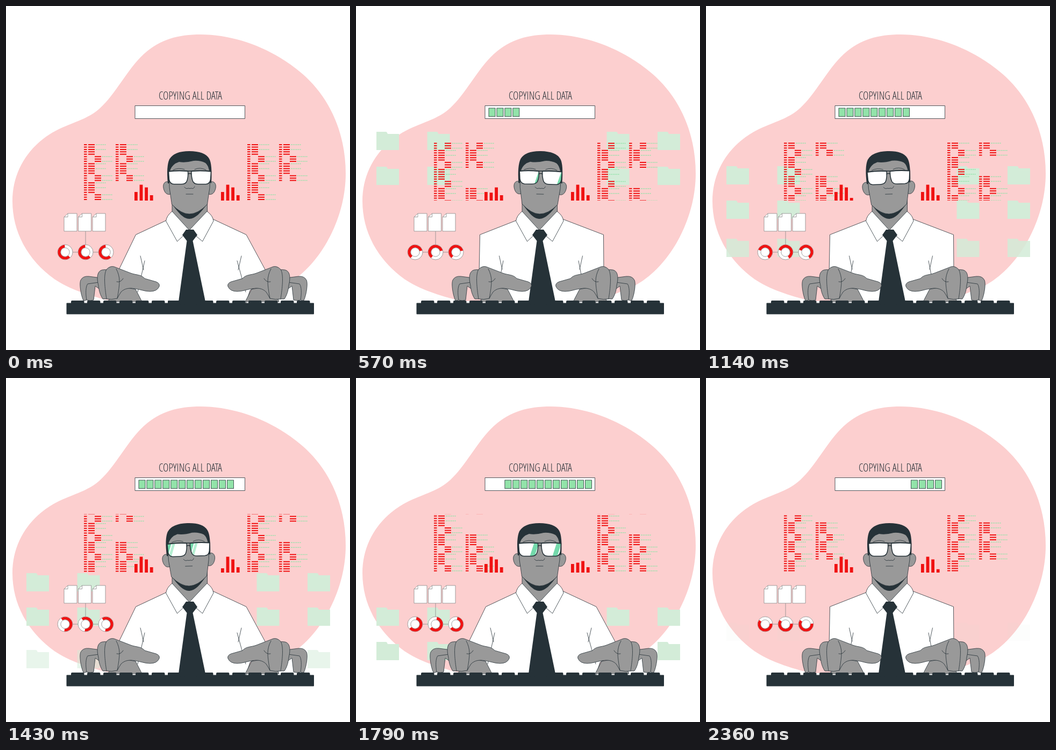
Animation of 640 by 640 pixels, one loop 2430 ms. Source, as an HTML page:

```html
<!DOCTYPE html>
<html lang="en">
<head>
<meta charset="utf-8">
<title>Copying all data</title>
<style>
html, body { margin: 0; width: 100%; height: 100%; overflow: hidden; background: #fff; }
svg { display: block; width: 100%; height: 100%; }
.ink { fill: #263238; }
.skin { fill: #999; stroke: #263238; stroke-width: .8; stroke-linejoin: round; }
.cloth { fill: #fff; stroke: #263238; stroke-width: .8; stroke-linejoin: round; }
.line { fill: none; stroke: #263238; stroke-width: .8; stroke-linecap: round; }
.paper { fill: #fff; stroke: #8a8a8a; stroke-width: .8; }
.red { fill: #f01212; }
#title {
  font-family: "Open Sans Condensed Light", "Roboto Condensed Light", "Roboto Condensed", "Open Sans Condensed", "Open Sans", sans-serif;
  font-weight: 300; font-stretch: 62.5%; font-size: 21px; text-anchor: middle; fill: #263238;
}
</style>
</head>
<body>
<svg viewBox="0 0 640 640">
  <defs>
    <clipPath id="desk"><rect width="640" height="549"/></clipPath>
    <clipPath id="listClip"><rect x="140" y="253.4" width="430" height="108.4"/></clipPath>
    <path id="lensL" d="M302.5 308 Q320 306 338.500 307.500 Q339.500 319 336 327 Q333 331.500 326 331.500 L312 331.500 Q305 331 303.500 323Z"/>
    <path id="lensR" d="M381.500 308 Q364 306 345 307.500 Q344.500 319 348 327 Q351 331.500 358 331.500 L372 331.500 Q379 331 380.500 323Z"/>
    <clipPath id="clipL"><use href="#lensL"/></clipPath>
    <clipPath id="clipR"><use href="#lensR"/></clipPath>
    <path id="folder" fill="#d3ecd8" d="M0 0H17.500Q19.500 0 20 2L21 4H42V34H0Z"/>
    <g id="hand" class="skin">
      <path d="M203 520 L241 527 L253 550 H190Z"/>
      <path d="M144 548 C139 537 136 516 139 510 Q143 502 154 503 L185 507 L180 520 L153 519 L151 546 Q147 549 144 548Z"/>
      <path d="M150 547 C148 535 148 522 152 517 L180 513 L176 528 L166 521 L163 547 Q157 549 150 547Z"/>
      <path d="M180 545 C175 537 173 530 172 520 C168 504 170 493 179 491 Q190 489 195 495 L194 543 Q187 546 180 545Z"/>
      <path d="M187 545 C184 525 181 500 187 490 Q194 483 201 485 L232 497 C243 501 251 499 258 507 L279 513 Q287 516 285 522 Q281 531 268 531 C257 531 250 527 240 526 C230 524 221 525 214 532 Q210 538 207 544 Q196 547 187 545Z"/>
      <path class="line" d="M205 489Q211 500 211 512Q211 523 207 544M218 507Q213 515 206 513"/>
    </g>
  </defs>

  <path fill="#fccfcf" clip-path="url(#desk)" d="M362 53C430 53 500 82 550 125C605 172 632 240 632 312C632 400 580 490 515 522C450 552 400 558 345 558H260C200 554 130 535 90 508C40 472 12 420 12 363C12 300 50 250 105 226C135 213 155 208 175 190C205 163 225 118 258 88C288 62 320 53 362 53Z"/>
  <g id="folders"></g>

  <text id="title" x="343" y="174">COPYING ALL DATA</text>
  <rect class="cloth" x="240" y="185.500" width="204.500" height="24"/>
  <g id="cells"></g>

  <g clip-path="url(#listClip)"><g id="lists"></g></g>
  <g id="bars" class="red"></g>
  <path class="paper" d="M148 419V445M110 458H186"/>
  <g id="docs"></g>

  <path id="shirt" class="cloth"/>
  <path id="folds" class="line"/>
  <path class="skin" d="M309 360V384L341 418L374.500 384V360Z"/>

  <g id="head">
    <path class="skin" d="M304 328C297 324 291 330 293 339C295 348 300 352 306 350Z"/>
    <path class="skin" d="M379 328C386 324 392 330 390 339C388 348 383 352 377 350Z"/>
    <path class="ink" d="M308.500 368C321 385 330 396 341 396C352 396 362 385 374.500 368Z"/>
    <path class="skin" d="M303 295L304 338L308.500 369Q326 387 341 387Q357 387 374.500 369L379 338L380 295Q341 268 303 295Z"/>
    <path class="ink" d="M301 330Q298 298 304 285Q313 270 341 270Q370 270 378 284Q384 294 382 330L379 328L378 306Q376 296 371 292Q361 287 349 288Q334 292 322 290L315 293Q307 299 305 307L303.500 330Z"/>
    <path class="line" d="M311 305Q321 300 332 304M351 304Q361 299 372 305"/>
    <path class="line" d="M332 337Q335 341 339 339Q342 340 345 339Q349 341 351 336M335 350H348"/>
    <use href="#lensL" fill="#fff"/>
    <use href="#lensR" fill="#fff"/>
    <g clip-path="url(#clipL)"><g class="glare"></g></g>
    <g clip-path="url(#clipR)"><g class="glare"></g></g>
    <g fill="none" stroke="#263238" stroke-width="1.500">
      <use href="#lensL"/><use href="#lensR"/>
      <path d="M338 313Q342 310 345.500 313M302 307.500Q320 305.500 339 307H345Q364 305.500 382 307.500"/>
    </g>
  </g>

  <path class="cloth" d="M309 382Q299 390 297.500 400L318.500 438L341 417Z"/>
  <path class="cloth" d="M374 382Q385 390 386 400L365.500 438L341 417Z"/>
  <path class="ink" d="M335 416H349L356 426L347.500 437L371 550H321L336.500 437L328 426Z"/>

  <use id="handL" href="#hand"/>
  <use id="handR" href="#hand"/>
  <g id="keys" class="ink">
    <rect x="112.500" y="552.500" width="460.500" height="21" rx="1"/>
    <rect x="301" y="548" width="84" height="8" rx="2"/>
  </g>
</svg>

<script>
const LOOP = 2430, STEPS = 34;
const $ = id => document.getElementById(id);

function add(parent, tag, attrs) {
  const el = document.createElementNS('http://www.w3.org/2000/svg', tag);
  for (const k in attrs) el.setAttribute(k, attrs[k]);
  parent.appendChild(el);
  return el;
}

// Linear interpolation through [step, value] pairs, clamped at both ends.
function track(keys, s) {
  if (s <= keys[0][0]) return keys[0][1];
  for (let n = 1; n < keys.length; n++) {
    const [a, va] = keys[n - 1], [b, vb] = keys[n];
    if (s <= b) return va + (vb - va) * (s - a) / (b - a);
  }
  return keys[keys.length - 1][1];
}

// Folders: each row carries four copies
const rows = [
  { y: [[4, 234], [12, 364], [16, 433], [20, 506], [24, 550]],
    o: [[1, 0], [4, 1], [15, 1], [16, .85], [20, .5], [24, 0]] },
  { y: [[8, 234], [12, 298], [16, 362], [20, 427], [25, 491], [29, 525]],
    o: [[5, 0], [8, 1], [25, 1], [29, 0]] },
  { y: [[12, 234], [16, 298], [20, 363], [25, 427], [33, 455]],
    o: [[9, 0], [12, 1], [25, 1], [33, .05], [34, 0]] }
];
for (const r of rows) {
  r.el = add($('folders'), 'g', {});
  for (const x of [38, 132.5, 466.5, 561]) add(r.el, 'use', { href: '#folder', x });
}

// Progress cells
const cells = Array.from({ length: 13 }, (_, k) => add($('cells'), 'rect', {
  x: 247 + 14.95 * k, y: 190, width: 12, height: 15.6,
  fill: '#92e3a9', stroke: '#263238', 'stroke-width': .8
}));

// Scrolling lists: blocks of five short and three indented rows
const BLOCK = 35.5, PITCH = BLOCK / 8;
function list(x, gaps) {
  let red = '', dots = '';
  for (let b = 0; b < 7; b++) {
    if (gaps && b % 3 === 2) continue;
    for (let r = 0; r < 8; r++) {
      const y = 258 + b * BLOCK + r * PITCH, indent = r > 4 ? 12 : 0;
      red += `M${x} ${y}h5.500M${x + 8 + indent} ${y}h12`;
      if ([0, 2, 5, 7].includes(r)) dots += `M${x + 22 + indent} ${y}h19`;
    }
  }
  add($('lists'), 'path', { d: red, stroke: '#f01212', 'stroke-width': 2 });
  add($('lists'), 'path', { d: dots, stroke: '#92e3a9', 'stroke-width': 1.5, 'stroke-dasharray': '2 1.3' });
}
for (const x of [145, 449]) { list(x, false); list(x + 59, true); }

// Bar charts
const heights = [16, 29.5, 24.5, 10];
const bars = [239, 400].flatMap(x => heights.map((h, k) =>
  ({ h, el: add($('bars'), 'rect', { x: x + 9.6 * k, width: 5.8 }) })));

// Documents and rings
for (const x of [108, 134.5, 161]) {
  add($('docs'), 'path', { class: 'paper', d: `M${x + 7} 386H${x + 24}V419H${x}V392.500ZV392.500H${x}` });
}
const rings = [110, 148, 186].map(x => {
  add($('docs'), 'circle', { class: 'paper', cx: x, cy: 458, r: 14 });
  const el = add($('docs'), 'circle', {
    cx: x, cy: 458, r: 11, fill: 'none', stroke: '#f01212',
    'stroke-width': 5.2, pathLength: 360, 'stroke-dasharray': '220 140'
  });
  add($('docs'), 'circle', { class: 'paper', cx: x, cy: 458, r: 8.2 });
  return { x, el };
});

// Lens reflections
const glares = [...document.querySelectorAll('.glare')];
for (const g of glares) {
  add(g, 'path', { d: 'M9 305h9l-9 28h-9z', fill: '#74d9ab' });
  add(g, 'path', { d: 'M20 305h5l-9 28h-5z', fill: '#b5efd2' });
}

// Keyboard
for (let k = 0; k < 15; k++) {
  add($('keys'), 'rect', { x: 121 + 30 * k, y: 548, width: 24.5, height: 8, rx: 2 });
}

const poses = {
  wide: {
    shirt: 'M298 399L241.500 425.500L203 505L238 529L246 554H446L454 529L490 505L447 425.500L386 397Z',
    folds: 'M250 465L256 491M258 474L245 532M438 465L432 491M430 474L446 532',
    shift: 0
  },
  near: {
    shirt: 'M298 399L230.500 425.500L229 500L250 554H445L461 500L460.500 425.500L386 397Z',
    folds: 'M266.500 465L272 490M274 474L268 505M421.500 465L416 490M414 474L420 505',
    shift: 41
  }
};

const sway = [[6, 0], [9, 1.8], [12, 1.8], [15, -1.7], [21, -1.7], [24, 0]];

function draw(s) {
  for (const r of rows) {
    r.el.setAttribute('transform', `translate(0 ${track(r.y, s)})`);
    r.el.setAttribute('opacity', track(r.o, s));
  }

  const filled = Math.floor(.6 * s + .001);
  const cleared = Math.floor(Math.max(0, s - 22.5) * .9);
  cells.forEach((c, k) => c.setAttribute('visibility', k < filled && k >= cleared ? 'visible' : 'hidden'));

  // Lists and rings make a longer first step
  const run = s ? s + .8 : 0;
  $('lists').setAttribute('transform', `translate(0 ${-2.8 * run})`);
  for (const { x, el } of rings) {
    el.setAttribute('transform', `rotate(${47 + 9.1 * run} ${x} 458)`);
  }

  bars.forEach(({ h, el }, k) => {
    const dip = Math.max(0, 1 - Math.abs(s - 4 - 4 * k) / 4);
    const now = h * (1 - dip / 2);
    el.setAttribute('y', 362 - now);
    el.setAttribute('height', now);
  });

  const gx = s < 13 ? 306 + 6 * (s - 4) : 293 + 6 * (s - 20);
  glares.forEach((g, k) => {
    g.setAttribute('transform', `translate(${gx + 42 * k} 0)`);
    g.setAttribute('visibility', gx > 286 && gx < 342 ? 'visible' : 'hidden');
  });

  $('head').setAttribute('transform', `rotate(${track(sway, s)} 341 395)`);

  const pose = (s >= 3 && s < 18) || s >= 29 ? poses.near : poses.wide;
  $('shirt').setAttribute('d', pose.shirt);
  $('folds').setAttribute('d', pose.folds);
  $('handL').setAttribute('transform', `translate(${pose.shift} 0)`);
  $('handR').setAttribute('transform', `translate(${698 - pose.shift} 0) scale(-1 1)`);
}

// Choose a type size that suits the face available
const title = $('title');
const size = 21 * 118 / title.getComputedTextLength();
title.style.fontSize = Math.min(21, Math.max(15, size)) + 'px';

const start = performance.now();
function tick() {
  const t = (performance.now() - start) % LOOP;
  draw(Math.floor((t + 4) * STEPS / LOOP) % STEPS);
  requestAnimationFrame(tick);
}
tick();
</script>
</body>
</html>
```
